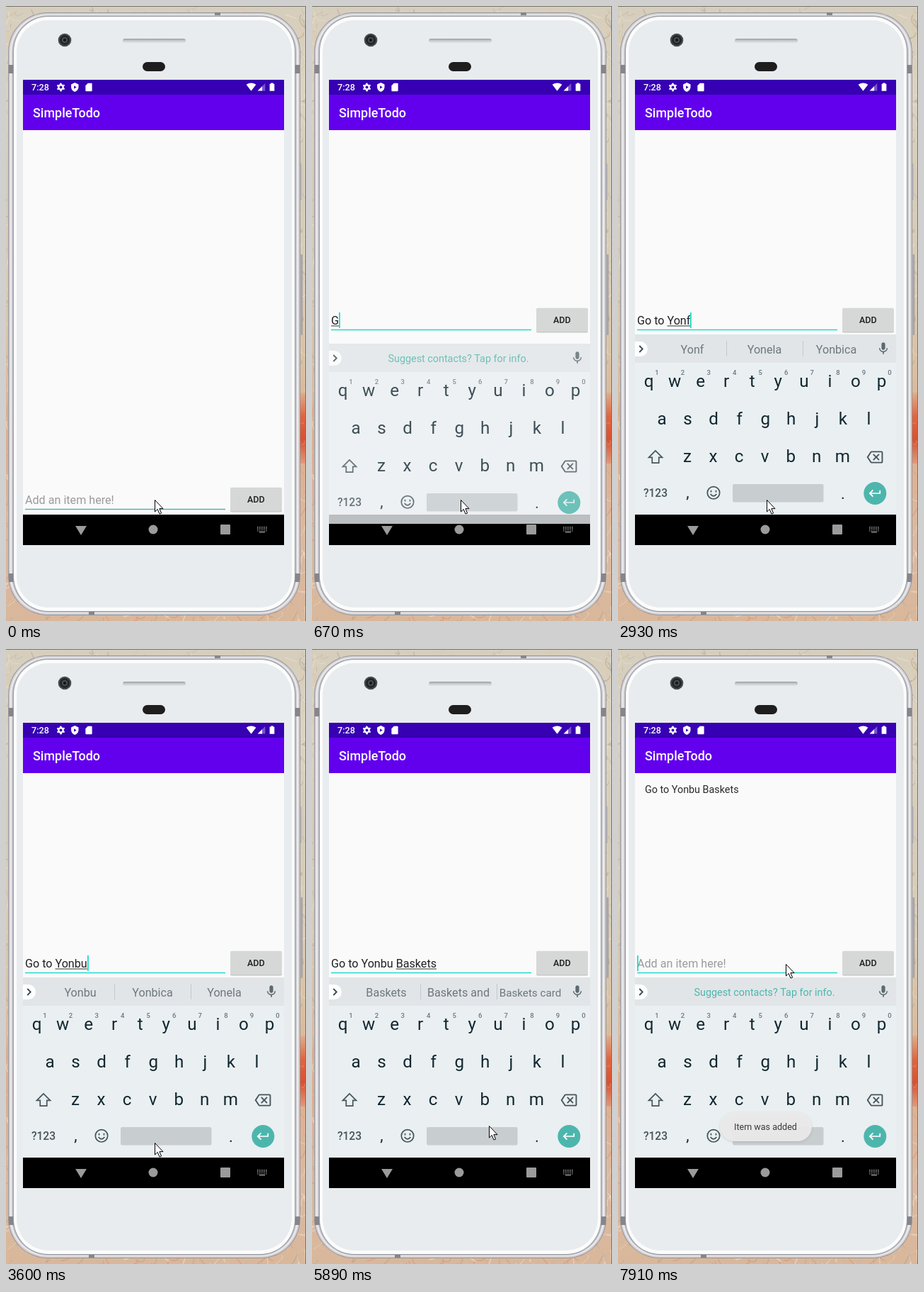
An HTML page with a canvas for the animation above (8 s loop, 424 px wide and 867 px high).

```html
<!DOCTYPE html>
<html lang="en">
<head>
<meta charset="utf-8">
<title>Todo list on a phone</title>
<style>
html, body { margin: 0; width: 100%; height: 100%; overflow: hidden; }
canvas { display: block; }
</style>
</head>
<body>
<canvas id="stage" width="424" height="867"></canvas>
<script>
const ctx = document.getElementById('stage').getContext('2d');
const LOOP = 8000;
const TEAL = '#4db6ac', ACCENT = '#20dbcb';

// ---- timeline: every step changes part of the state ----
const GO = 'Go to ', NAME = GO + 'Yonbu ';
const type = (text, from, tips) => ({ text, from, caret: 1, ...(tips && { tips }) });
const move = (x, y, more) => ({ mouse: [x, y], ...more });
const more = ['Baskets', 'Baskets and', 'Baskets card'];
const bask = part => [part, '*Baskets', 'Baskets and'];

const steps = [
  [0, { text: '', from: 0, caret: 0, tips: null, mouse: [210, 696], drop: 253, keys: 0, slide: 0, ripple: 0, item: '', toast: 0 }],
  [250, { caret: 1 }],
  [530, { drop: 0 }],
  [670, { ...type('G', 0), keys: .8, slide: 13 }],
  [790, { ...type('Go', 0), keys: 1, slide: 0 }],
  [1190, { caret: 0 }],
  [1470, type('Go t', 3)],
  [1620, type('Go to', 3)],
  [1740, type(GO, 6)],
  [2300, { caret: 0 }],
  [2450, type(GO + 'Y', 6)],
  [2570, type(GO + 'Yo', 6, ['Yo', 'You', 'Your'])],
  [2690, type(GO + 'Yon', 6)],
  [2810, type(GO + 'Yonf', 6, ['Yon', 'Yonela', 'Yonbica'])],
  [2930, { tips: ['Yonf', 'Yonela', 'Yonbica'] }],
  [3330, type(GO + 'Yon', 6)],
  [3450, { tips: ['Yon', 'Yonela', 'Yonbica'] }],
  [3600, type(GO + 'Yonbu', 6, ['Yonbu', 'Yonbica', 'Yonela'])],
  [3880, { ...type(NAME, 12), tips: null }],
  [4160, type(NAME + 'B', 12, bask('B'))],
  [4410, type(NAME + 'Ba', 12, bask('Ba'))],
  [4690, type(NAME + 'Bask', 12, bask('Bas'))],
  [4810, type(NAME + 'Baske', 12, bask('Baske'))],
  [4930, type(NAME + 'Basket', 12, bask('Basket'))],
  [5220, type(NAME + 'Baskets', 12, more)],
  [5640, { caret: 0 }],
  [5890, move(250, 672)],
  [6010, move(395, 590)],
  [6130, move(379, 507, { caret: 1 })],
  [6280, move(362, 452)],
  [6400, move(355, 438)],
  [6550, move(352, 433, { ripple: 14 })],
  [6670, { ripple: 27, caret: 0 }],
  [6820, { ...type('', 0), ripple: 60 }],
  [6970, { ripple: 0, item: NAME + 'Baskets', tips: null, toast: .3 }],
  [7120, move(349, 434, { toast: .7 })],
  [7240, move(338, 437, { toast: .92 })],
  [7360, move(322, 441, { caret: 0 })],
  [7520, move(254, 438)],
  [7670, move(246, 440)],
  [7790, move(240, 442)],
  [7910, move(237, 444, { caret: 1 })]
];
let sum = {};
const states = steps.map(([, change]) => (sum = { ...sum, ...change }));

// ---- drawing helpers ----
function box(x, y, w, h, fill, radius = 0) {
  ctx.fillStyle = fill;
  ctx.beginPath();
  ctx.roundRect(x, y, w, h, radius);
  ctx.fill();
}
function disc(x, y, r, fill) {
  ctx.fillStyle = fill;
  ctx.beginPath();
  ctx.arc(x, y, r, 0, 7);
  ctx.fill();
}
function label(text, x, y, size, fill, align = 'left', weight = 400) {
  ctx.font = `${weight} ${size}px Roboto, sans-serif`;
  ctx.textAlign = align;
  ctx.fillStyle = fill;
  ctx.fillText(text, x, y);
}
// Icons live on a 24-unit grid centred on x, y.
function icon(path, x, y, scale, fill, line = 0) {
  ctx.save();
  ctx.translate(x, y);
  ctx.scale(scale, scale);
  ctx.translate(-12, -12);
  const shape = new Path2D(path);
  ctx.fillStyle = ctx.strokeStyle = fill;
  ctx.lineWidth = line;
  if (line) ctx.stroke(shape); else ctx.fill(shape, 'evenodd');
  ctx.restore();
}
function gradient(x0, y0, x1, y1, ...colors) {
  const g = ctx.createLinearGradient(x0, y0, x1, y1);
  colors.forEach((c, i) => g.addColorStop(i / (colors.length - 1), c));
  return g;
}

// ---- backdrop and handset ----
function wallpaper() {
  box(0, 0, 424, 867, gradient(0, 0, 0, 867, '#d6cebd', '#dcd3c2', '#d5ccba', '#d9cdb9', '#d9c2a4', '#dfae8c', '#dcb9a0', '#d9b79b'));
  box(412, 545, 12, 100, gradient(0, 545, 0, 645, '#dfae8c', '#e0653f', '#d9512f', '#e09a7c'));
  let seed = 7;
  const rnd = n => (seed = seed * 16807 % 2147483647) / 2147483647 * n;
  const tints = ['#f0eadc88', '#a89c8a77', '#e6c59a88', '#c3b8a888', '#d8805a66'];
  for (let i = 0; i < 420; i++) {
    const side = rnd(4) | 0, along = rnd(867);
    const x = side < 2 ? side * 412 + rnd(14) : rnd(424);
    const y = side < 2 ? along : side === 2 ? rnd(45) : 822 + rnd(45);
    ctx.strokeStyle = tints[rnd(y > 480 ? 5 : 4) | 0];
    ctx.lineWidth = .6 + rnd(1);
    ctx.beginPath();
    ctx.moveTo(x, y);
    ctx.quadraticCurveTo(x + rnd(16) - 8, y + rnd(12), x + rnd(30) - 15, y + rnd(28) - 6);
    ctx.stroke();
  }
  box(0, 0, 424, 1, '#77736c');
  box(423, 0, 1, 867, '#77736c');
}
function handset() {
  box(414, 222, 4, 52, '#b9b9bd', 1);
  box(414, 350, 5, 114, gradient(414, 0, 419, 0, '#e4e4e7', '#8f8f94'), 1);
  box(3, 9, 413, 850, '#96959b', 56);
  box(4, 10, 411, 848, '#d3d2d6', 55);
  box(6, 12, 407, 844, '#ededf0', 53);
  box(8, 13, 403, 842, '#c5c4c9', 52);
  for (const x of [4, 408]) for (const y of [83, 800]) box(x, y, 7, 12, '#85858b');
  for (const x of [295, 117]) box(x, x > 200 ? 9 : 854, 8, 4, '#85858b');
  box(10, 14, 399, 840, '#99989e', 50);
  box(11, 15, 397, 838, '#fbfcfc', 49);
  box(15, 20, 389, 828, '#e9ecee', 45);
  disc(83, 48, 9.3, '#47494b');
  disc(83, 48, 7, '#222427');
  disc(83, 48, 4, '#4c5054');
  disc(83, 48, 2.2, '#15171a');
  box(165, 46, 89, 6, gradient(0, 46, 0, 52, '#9b9da0', '#c9cccd', '#e2e4e5'), 3);
  box(193, 79, 32, 13, '#1e1e1f', 6.5);
}

// ---- app ----
function appBars() {
  box(24, 104, 369, 656, '#fafafa');
  box(24, 104, 369, 21, '#3700b3');
  box(24, 125, 369, 50, '#6200ee');
  label('7:28', 36, 119.3, 12.6, '#fff', 'left', 500);
  ctx.strokeStyle = '#fff';
  ctx.lineWidth = 2.4;
  ctx.beginPath();
  ctx.arc(77.5, 114.5, 3.2, 0, 7);
  ctx.stroke();
  for (let i = 0; i < 6; i++) {
    const a = i * Math.PI / 3 + .5;
    disc(77.5 + 4.7 * Math.cos(a), 114.5 + 4.7 * Math.sin(a), 1.3, '#fff');
  }
  icon('M12 1L3 5v6c0 5.55 3.84 10.74 9 12 5.16-1.26 9-6.45 9-12V5zM10 8l6 4-6 4z', 97.3, 114.5, .58, '#fff');
  icon('M18 2h-8L4 8v12q0 2 2 2h12q2 0 2-2V4q0-2-2-2z', 117, 114.5, .58, '#fff');
  icon('M12 22L.5 7Q12-1 23.5 7z', 346.5, 113.8, .6, '#fff');
  icon('M2 22H22V2z', 361, 114.2, .53, '#ffffff55');
  icon('M2 22H14V10z', 361, 114.2, .53, '#fff');
  icon('M9 2h6v2h3v18H6V4h3z', 376, 114.2, .56, '#fff');
  label('SimpleTodo', 38, 157, 17.94, '#fff', 'left', 500);
}
function navBar() {
  box(24, 717, 369, 43, '#000');
  icon('M0 0H24L12 20z', 106, 740.8, .66, '#9b9b9b');
  disc(208, 738, 6.5, '#9b9b9b');
  box(303, 731, 14, 14, '#9b9b9b', 1);
  for (let i = 0; i < 15; i++) box(355 + i % 5 * 3, 734 + (i / 5 | 0) * 2.6, 1.7, 1.4, '#8d8d8d');
  box(358, 741, 8, 1.4, '#8d8d8d');
}
function entryRow(s) {
  ctx.save();
  ctx.translate(0, s.drop);
  box(27, 455.7, 283, 1.6, s.drop ? '#55b3aa' : ACCENT);
  label(s.text || 'Add an item here!', 27, 449, 16.14, s.text ? '#212121' : '#9b9b9b');
  const end = 27 + (s.text ? ctx.measureText(s.text).width : 0);
  const start = 27 + ctx.measureText(s.text.slice(0, s.from)).width;
  box(start, 450.5, end - start, 1, '#333');
  if (s.caret) box(Math.round(end), 432, 1.8, 22, ACCENT);

  box(317, 427, 73, 33.5, '#c3c4c4', 2);
  box(317, 425.8, 73, 33.5, '#d6d7d7', 2);
  if (s.ripple) {
    ctx.save();
    ctx.beginPath();
    ctx.roundRect(317, 425.8, 73, 33.5, 2);
    ctx.clip();
    disc(353, 442, s.ripple, '#00000024');
    ctx.restore();
  }
  label('ADD', 353.3, 446.5, 12.56, '#1f1f1f', 'center', 500);
  ctx.restore();
}

// ---- keyboard ----
function tipStrip(tips) {
  box(24, 463, 369, 40, '#e1e5e8');
  box(24, 473, 18, 21, '#fff', [0, 10.5, 10.5, 0]);
  icon('M9 6l6 6-6 6', 32.5, 483.5, .75, '#38474e', 2.4);
  icon('M12 14c1.66 0 3-1.34 3-3V5c0-1.66-1.34-3-3-3S9 3.34 9 5v6c0 1.66 1.34 3 3 3zm5.3-3c0 3-2.54 5.1-5.3 5.1S6.7 14 6.7 11H5c0 3.41 2.72 6.23 6 6.72V21h2v-3.28c3.28-.48 6-3.3 6-6.72h-1.7z', 375, 483, .87, '#5d6a70');
  if (!tips) return label('Suggest contacts? Tap for info.', 207, 489, 14.35, TEAL, 'center');
  for (const x of [153, 261]) box(x, 472, 1, 22, '#c2c8cb');
  tips.forEach((tip, i) => {
    const best = tip[0] === '*';
    const size = i === 2 && tip.length > 8 ? 15.2 : 16.14;
    label(best ? tip.slice(1) : tip, [105, 207, 308.5][i], 489.5, size, best ? '#000' : '#6d787d', 'center', best ? 700 : 400);
  });
}
function keyboard(s) {
  const ink = '#11272f', soft = '#46555b';
  ctx.save();
  ctx.globalAlpha = s.keys;
  ctx.translate(0, s.slide);
  box(24, 503, 369, 214, '#eaeff2');
  tipStrip(s.tips);
  [['qwertyuiop', 43.5], ['asdfghjkl', 62], ['zxcvbnm', 98]].forEach(([row, left], r) => {
    [...row].forEach((key, i) => {
      const x = left + i * 36.55;
      label(key, x, 537 + r * 53, 24.2, ink, 'center');
      if (!r) label((i + 1) % 10, x + 11.5, 519.5, 9.5, '#6b777d', 'center', 500);
    });
  });
  icon('M12 3L2 13h5v8h10v-8h5z', 53, 635.5, .95, soft, 1.8);
  icon('M22 3H7c-.69 0-1.23.35-1.59.88L0 12l5.41 8.11c.36.53.9.89 1.59.89h15c1.1 0 2-.9 2-2V5c0-1.1-.9-2-2-2zm0 16H7.07L2.4 12l4.66-7H22v14zm-11.59-2L14 13.41 17.59 17 19 15.59 15.41 12 19 8.41 17.59 7 14 10.59 10.41 7 9 8.41 12.59 12 9 15.59z', 363, 636, .95, soft);
  label('?123', 53, 692, 15.6, soft, 'center', 500);
  label(',', 98.5, 693, 22, ink, 'center');
  label('.', 318, 694.5, 22, ink, 'center');
  icon('M2 12a10 10 0 1 0 20 0a10 10 0 1 0-20 0M7 14q5 6.5 10 0M8 8v3M16 8v3', 135, 686.3, .87, soft, 2);
  box(162, 674, 128.5, 25.5, '#c8cdd0', 2);
  disc(363.3, 687, 16, TEAL);
  icon('M19 7v4H5.83l3.58-3.59L8 6l-6 6 6 6 1.41-1.41L5.83 13H21V7z', 363.3, 687, .87, '#fff');
  ctx.restore();
}

function toast(alpha) {
  ctx.save();
  ctx.globalAlpha = alpha;
  ctx.shadowColor = '#00000022';
  ctx.shadowBlur = 3;
  ctx.shadowOffsetY = 1;
  box(144, 653, 130, 41, '#ececec', 20.5);
  ctx.shadowColor = 'transparent';
  label('Item was added', 208.5, 678, 12.56, '#2b2b2b', 'center');
  ctx.restore();
}
function pointer([x, y]) {
  const arrow = 'M.5.5V17L4.2 13.4 7 20 9.6 19 6.9 12.6H12z';
  icon(arrow, x + 12, y + 12, 1, '#fff');
  icon(arrow, x + 12, y + 12, 1, '#000', 1);
}

function draw(s) {
  wallpaper();
  handset();
  appBars();
  label(s.item, 38, 202.5, 14.35, '#2a2a2a');
  entryRow(s);
  navBar();
  if (s.keys) keyboard(s);
  if (s.toast) toast(s.toast);
  pointer(s.mouse);
}

let shown;
function tick() {
  const t = performance.now() % LOOP;
  const state = states[steps.findLastIndex(([start]) => start <= t)];
  if (state !== shown) draw(shown = state);
  requestAnimationFrame(tick);
}
tick();
</script>
</body>
</html>
```
